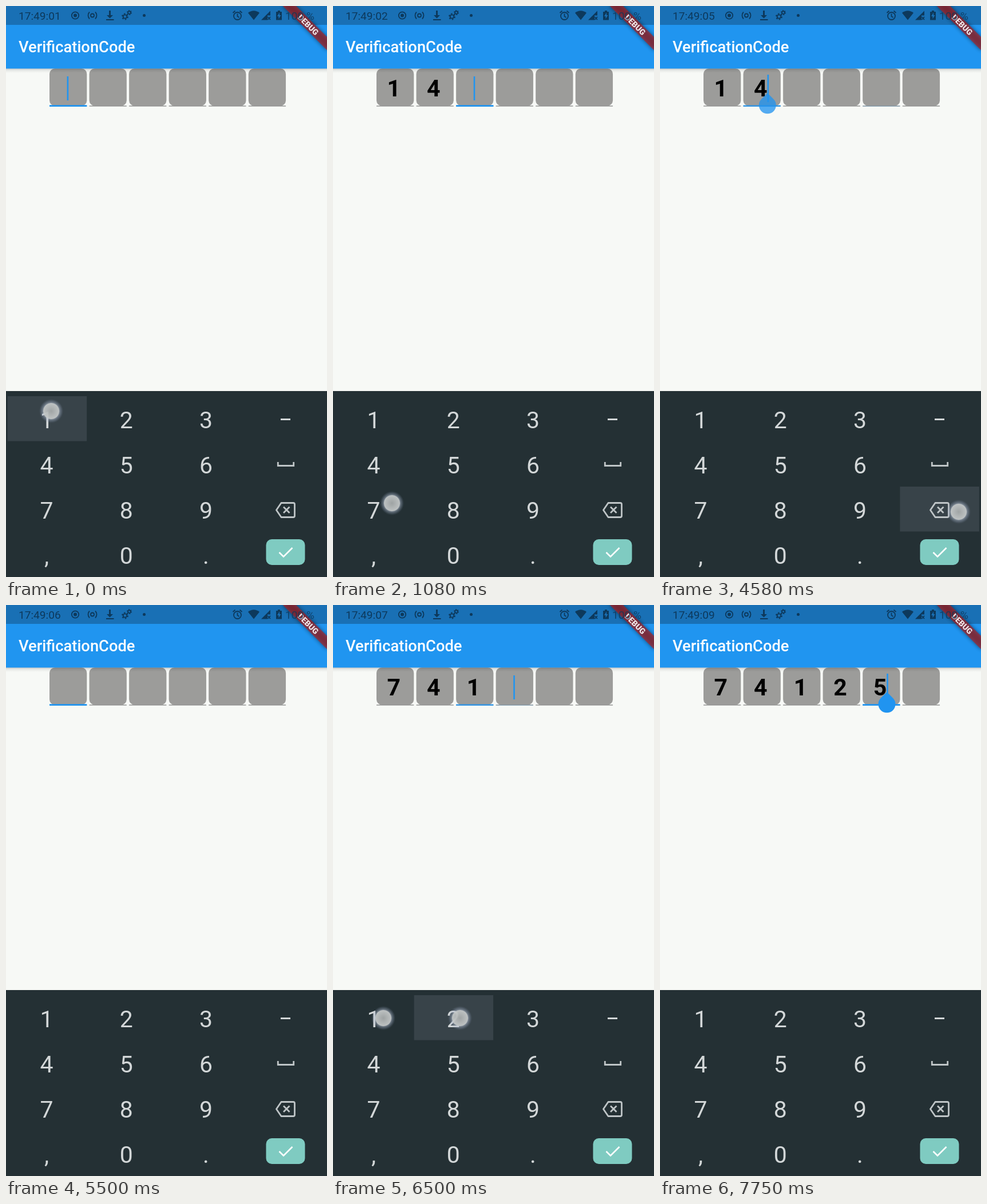
An HTML page for the animation above (8 s loop, 561 by 998 pixels).

```html
<!DOCTYPE html>
<html lang="en">
<head>
<meta charset="utf-8">
<title>Verification code</title>
<style>
  html, body { margin: 0; width: 100%; height: 100%; overflow: hidden; background: #f7f9f6; }
  svg { display: block; width: 100%; height: 100%; font-family: Roboto, "Noto Sans", sans-serif; }
  .status { fill: #0d395c; font-size: 19.1px; }
  .line { fill: none; stroke: #0d395c; stroke-width: 1.8; }
  .title { fill: #fff; font-size: 27.3px; font-weight: 500; }
  .debug { fill: #fff; fill-opacity: .88; font-size: 13.9px; font-weight: 900; text-anchor: middle; }
  .digit { font-size: 41px; font-weight: 700; text-anchor: middle; }
  .key { fill: #d3d7d8; font-size: 41px; text-anchor: middle; }
  .glyph { fill: none; stroke: #bfc5c7; stroke-width: 2.8; }
  .accent { fill: #2094f0; }
</style>
</head>
<body>
<svg viewBox="0 0 561 998" preserveAspectRatio="none">
  <defs>
    <linearGradient id="shade" x2="0" y2="1">
      <stop offset="0" stop-opacity=".2"/>
      <stop offset=".4" stop-opacity=".07"/>
      <stop offset="1" stop-opacity="0"/>
    </linearGradient>
    <radialGradient id="touch">
      <stop offset="0" stop-color="#a9adad" stop-opacity=".92"/>
      <stop offset=".64" stop-color="#c4c8c8" stop-opacity=".95"/>
      <stop offset=".7" stop-color="#b4bfd0" stop-opacity=".5"/>
      <stop offset="1" stop-color="#8090b0" stop-opacity="0"/>
    </radialGradient>
    <filter id="soft" x="-20%" y="-80%" width="140%" height="260%">
      <feGaussianBlur stdDeviation="3.5"/>
    </filter>
  </defs>

  <rect width="561" height="998" fill="#f7f9f6"/>
  <g id="boxes"></g>
  <rect id="cursor" class="accent"/>
  <path id="handle" class="accent" d="M0-21.2L10.6-10.6A15 15 0 1 1-10.6-10.6Z"/>

  <rect y="109" width="561" height="8" fill="url(#shade)"/>
  <rect width="561" height="109.4" fill="#2095f0"/>
  <rect width="561" height="33" fill="#1970b5"/>
  <text class="title" x="22" y="81">VerificationCode</text>

  <g transform="translate(561 0) rotate(45)">
    <rect x="-54.6" y="38.2" width="109.2" height="16.4" opacity=".5" filter="url(#soft)"/>
    <rect x="-54.6" y="38.2" width="109.2" height="16.4" fill="#b71c1c" fill-opacity=".63"/>
    <text class="debug" y="51.4">DEBUG</text>
  </g>

  <g class="status">
    <text id="clock" x="22" y="23.5"></text>
    <text x="488" y="23.5" opacity=".8">100 %</text>
    <circle class="line" cx="121" cy="16.5" r="6.2"/>
    <circle cx="121" cy="16.5" r="3"/>
    <circle class="line" cx="151" cy="16.5" r="3"/>
    <path class="line" d="M146 10.500a8.500 8.500 0 0 0 0 12M156 10.500a8.500 8.500 0 0 1 0 12"/>
    <path d="M180 8h3v8h4l-5.500 5.500-5.500-5.500h4zM175 23h13.500v2H175z"/>
    <circle class="line" cx="208" cy="18.500" r="3.200" stroke-width="2.500"/>
    <circle class="line" cx="208" cy="18.500" r="5" stroke-dasharray="2.600 2.640"/>
    <circle class="line" cx="215.500" cy="11.500" r="2.400"/>
    <circle class="line" cx="215.500" cy="11.500" r="3.500" stroke-dasharray="1.830 1.830" stroke-width="1.200"/>
    <circle cx="241.500" cy="16.500" r="2.500"/>
    <circle class="line" cx="404.500" cy="17.500" r="6.500"/>
    <path class="line" d="M404.500 13.500v4.500l3 2M396.500 12l4-3.500M412.500 12l-4-3.500"/>
    <path d="M433 24.500L423 12q10-7.500 20 0z"/>
    <path d="M446 24.500L462 8.500v8h-5v8z"/>
    <path class="line" stroke-width="1.500" d="M457.500 19l4.500 5M462 19l-4.500 5"/>
    <path d="M475 8h4v2h3v14.500h-10V10h3z"/>
    <path d="M478 11.500l-4 6.500h2.500v4.500l4-6.500H478z" fill="#1970b5"/>
  </g>

  <rect y="673" width="561" height="325" fill="#243034"/>
  <g id="presses" fill="#384349"></g>
  <g id="keys" class="key"></g>
  <rect x="480" y="721" width="17" height="3" fill="#d3d7d8"/>
  <path class="glyph" d="M475.300 797v6.500h27.400V797"/>
  <path class="glyph" stroke-linejoin="round" d="M472.500 881l8.500-12.500h21q2.500 0 2.500 2.500v20q0 2.500-2.500 2.500h-21zM485 875.500l10.500 10.500M495.500 875.500L485 886"/>
  <rect x="454.500" y="932" width="68" height="45" rx="10" fill="#7fcbc1"/>
  <path d="M477.500 955l7.500 7.500 15.500-15.500" fill="none" stroke="#fff" stroke-width="2.600"/>
  <g id="touches" fill="url(#touch)"></g>
</svg>
<script>
  const LOOP = 8000, STEP = 1000 / 12;
  const LEFT = 76, PITCH = 69.55, WIDTH = 65.3;
  const $ = id => document.getElementById(id);
  const clamp = v => Math.max(0, Math.min(1, v));

  function add(parent, tag, attrs, text = '') {
    const el = document.createElementNS('http://www.w3.org/2000/svg', tag);
    set(el, attrs);
    el.textContent = text;
    return parent.appendChild(el);
  }
  function set(el, attrs) {
    for (const name in attrs) el.setAttribute(name, attrs[name]);
  }

  // Field states: start step, digits, focused box, selection handle shown
  const states = [
    [-5, '', 0], [1, '1', 1], [8, '14', 2], [14, '147', 3], [27, '1478', 4],
    [53.4, '14', 1, true], [57, '1', 0, true], [60, '', 0],
    [73, '7', 1], [75, '74', 2], [78, '741', 3], [80, '7412', 4],
    [82, '74125', 5], [90, '74125', 4, true]
  ];

  // Touches: press step, release step, key column, key row, x, y
  const taps = [
    [-1, 1, 0, 0, 79, 708], [5, 7, 0, 1, 95, 806], [11, 13, 0, 2, 103, 869],
    [24, 26, 1, 2, 228, 872], [28, 30, 1, 1, 241, 808],
    [54, 56, 3, 2, 522, 884], [58, 60, 3, 2, 522, 884],
    [71, 72, 0, 2, 84, 863], [73, 75, 0, 1, 90, 805], [76, 78, 0, 0, 88, 722],
    [78, 80, 1, 0, 222, 722], [81, 82, 1, 1, 228, 806], [89, 90, 3, 2, 518, 884]
  ].map(([from, to, col, row, cx, cy]) => ({
    from, to,
    key: add($('presses'), 'rect', { x: 2.7 + col * 138.9, y: 682 + row * 79, width: 138.5, height: 78.5 }),
    dot: add($('touches'), 'circle', { cx, cy, r: 21 })
  }));

  const boxes = Array.from({ length: 6 }, (_, i) => {
    const x = LEFT + i * PITCH, g = $('boxes');
    add(g, 'rect', { x, y: 109.3, width: WIDTH, height: 65.2, rx: 9.5, fill: '#9c9c9a' });
    add(g, 'rect', { x, y: 174.2, width: WIDTH, height: 1.3, fill: '#858585' });
    return {
      line: add(g, 'rect', { x, width: WIDTH, class: 'accent' }),
      digit: add(g, 'text', { x: x + 30.3, y: 158, class: 'digit' })
    };
  });

  ['123', '456', '789', ',0.'].forEach((row, r) => [...row].forEach((char, c) =>
    add($('keys'), 'text', { x: 71 + c * 139.2, y: 738 + r * 79, }, char)));

  function draw(time) {
    let n = Math.floor((time % LOOP + 4) / STEP) % 96;
    if (n > 30 && n < 55) n = 30;

    $('clock').textContent = '17:49:0' + (Math.floor((n + 3) / 12) + 1);

    const at = states.findLastIndex(s => s[0] <= n);
    const [start, digits, focus, grip] = states[at];
    const before = at ? states[at - 1][2] : focus;
    const age = n - start;
    const shift = clamp((age + .4) / 2.4);

    boxes.forEach(({ line, digit }, i) => {
      const glow = i === focus ? (before === focus ? 1 : shift) : i === before ? 1 - shift : 0;
      const height = 1.3 + 1.5 * glow;
      set(line, { y: 175.9 - height, height, opacity: glow });
      digit.textContent = digits[i] || '';
    });

    const x = LEFT + focus * PITCH;
    set($('cursor'), {
      x: x + (grip ? 42 : 30.6), y: grip ? 120 : 123,
      width: 2.6, height: grip ? 48 : 42,
      opacity: Math.floor(age / 6) % 2 ? 0 : 1
    });
    set($('handle'), {
      transform: `translate(${x + 42.3} 173.3)`,
      opacity: grip ? clamp(age / 2.1) : 0
    });

    for (const { from, to, key, dot } of taps) {
      set(key, { opacity: n >= from && n < to ? 1 : 0 });
      set(dot, { opacity: n < from || n > to + 1 ? 0 : n > to ? .42 : 1 });
    }
  }

  const begin = performance.now();
  (function tick() {
    draw(performance.now() - begin);
    requestAnimationFrame(tick);
  })();
</script>
</body>
</html>
```
